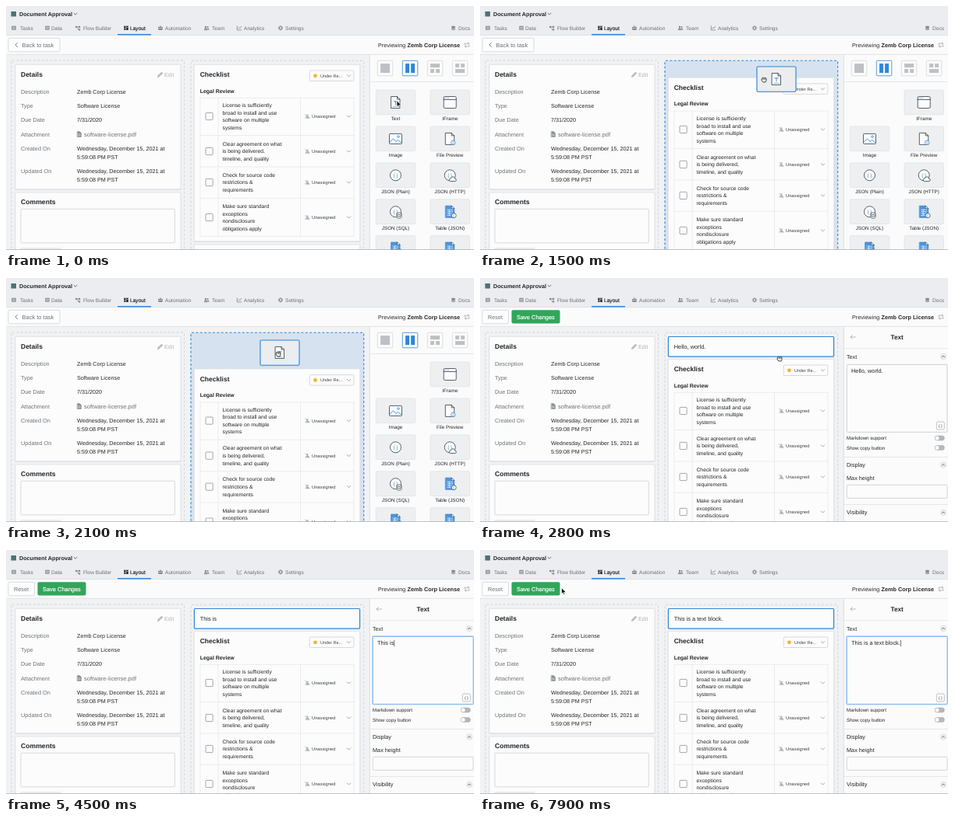
Animation, 600 px wide and 314 px high, one loop 8 s. Source, as an HTML page:

```html
<!DOCTYPE html>
<html lang="en">
<head>
<meta charset="utf-8">
<title>Layout editor</title>
<style>
html, body { margin: 0; width: 100%; height: 100%; overflow: hidden; background: #f1f2f4; }
svg { display: block; width: 100vw; height: 100vh; }
text { font-family: "Liberation Sans", Arial, sans-serif; white-space: pre; text-rendering: geometricPrecision; }
</style>
</head>
<body>
<svg id="stage" viewBox="0 0 600 314" preserveAspectRatio="none"></svg>
<script>
const LOOP = 8000;
const BLUE = '#3186d8', INK = '#232629', MUTED = '#6d7278', LINE = '#dee0e4', PAPER = '#fcfcfc';
const OWNER = 'Zemb Corp License';

// ---- drawing helpers (y of text is its visual middle) ----
const text = (x, y, s, size, fill = INK, weight = 'normal', anchor = 'start') => {
  const medium = weight === 'medium' ? ` stroke="${fill}" stroke-width=".18"` : '';
  const bold = weight === 'bold' ? ' font-weight="700"' : '';
  return `<text x="${x}" y="${(y + size * 0.36).toFixed(2)}" font-size="${size}" fill="${fill}" text-anchor="${anchor}"${bold}${medium}>${s}</text>`;
};
const box = (x, y, w, h, fill = 'none', stroke = 'none', r = 0, sw = 1, extra = '') =>
  `<rect x="${x}" y="${y}" width="${w}" height="${h}" rx="${r}" fill="${fill}" stroke="${stroke}" stroke-width="${sw}" ${extra}/>`;
const path = (d, stroke = MUTED, sw = 0.8, fill = 'none') =>
  `<path d="${d}" fill="${fill}" stroke="${stroke}" stroke-width="${sw}" stroke-linejoin="round" stroke-linecap="round"/>`;
const circle = (x, y, r, fill = 'none', stroke = 'none', sw = 0.8) =>
  `<circle cx="${x}" cy="${y}" r="${r}" fill="${fill}" stroke="${stroke}" stroke-width="${sw}"/>`;
const at = (x, y, body) => `<g transform="translate(${x} ${y})">${body}</g>`;
const group = (id, body) => `<g id="${id}">${body}</g>`;
const chevron = (x, y, r = 2.2, color = '#8a8f95') =>
  path(`M${x - r} ${y - r / 2}l${r} ${r} ${r} ${-r}`, color, 0.8);
const card = (x, y, w, h) =>
  box(x - 0.5, y, w + 1, h + 1.2, '#e0e2e5', 'none', 1) + box(x, y, w, h, PAPER, '#d9dce0', 1, 0.7);

// ---- header and toolbar ----
function header() {
  const c = '#85898f';
  const icons = [
    [10, box(-2.8, -2.5, 5.6, 5, c, 'none', 0.5) + path('M-1.6-.9h3.2M-1.6.9h3.2', '#fff', 0.6)],
    [53, box(-2.8, -2.5, 5.6, 5, c, 'none', 0.5) + path('M-2-.8h4M-2 .9h4', '#fff', 0.6)],
    [92, box(-3, -2.5, 2.2, 2.2, c) + box(1, -2.5, 2.2, 2.2, c) + box(1, 1, 2.2, 2.2, c) + path('M-1-1.4h2M0-1.4v3.4h1', c, 0.6)],
    [154, box(-2.7, -2.6, 2.2, 3, INK) + box(-2.7, 0.9, 2.2, 1.8, INK) + box(0.2, -2.6, 2.6, 1.8, INK) + box(0.2, -0.3, 2.6, 3, INK)],
    [198, box(-2.8, -1.5, 5.6, 4.2, c, 'none', 0.8) + path('M0-3v1.5', c) + circle(-1.1, 0.3, 0.6, '#fff') + circle(1.1, 0.3, 0.6, '#fff')],
    [257, circle(-1, -1.4, 1.2, c) + circle(1.6, -1.2, 1, c) + path('M-3 2.4q0-2.2 2-2.2t2 2.2z', c, 0.3, c) + path('M1.3 2.2h2q0-2-2-1.9', c, 0.3, c)],
    [299, path('M-2.7-2.6v5.2h5.4M-1.3.8L0-.8 1 .2l1.6-2', c, 0.8)],
    [352, circle(0, 0, 1.8, 'none', c, 1.2) + path('M0-2.9v.8M0 2.1v.8M-2.9 0h.8M2.1 0h.8M-2-2l.5.5M1.5 1.5l.5.5M-2 2l.5-.5M1.5-1.5l.5-.5', c, 0.8)],
    [573.5, box(-2.2, -2.6, 4.4, 5.2, c, 'none', 0.6) + path('M-1.2 1.3h2.6', '#fff', 0.6)]
  ];
  const tabs = [[18, 'Tasks'], [58, 'Data'], [99, 'Flow Builder'], [204, 'Automation'],
    [264, 'Team'], [305, 'Analytics'], [358, 'Settings'], [580, 'Docs']];
  return box(0, 0, 600, 38, '#ebedf0') + box(0, 37.6, 600, 24.6, '#fbfbfb') +
    path('M0 37.6H600M0 62.3H600', '#d9dbdf', 0.7) +
    box(6.5, 7, 6.5, 6.5, '#4d7377') +
    text(17, 10, 'Document Approval', 7.2, INK, 'bold') + chevron(89, 10.2, 2, '#555') +
    icons.map(([x, body]) => at(x, 28.3, body)).join('') +
    tabs.map(([x, s]) => text(x, 28.3, s, 6.6, '#6b7076')).join('') +
    text(159, 28.3, 'Layout', 6.6, INK, 'medium') + box(143, 36, 43, 1.5, BLUE) +
    text(477, 50, 'Previewing', 7.2) + text(582, 50, OWNER, 7.28, INK, 'bold', 'end') +
    path('M588 50v-1.8h5.5M592.2 46.8l1.5 1.4-1.5 1.4M594 50.2v1.8h-5.5M589.8 50.6l-1.5 1.4 1.5 1.4', '#9a9ea4', 0.7);
}
const backButton = () => box(3, 41.3, 66, 17.5, '#fdfdfd', '#cfd2d7', 1.5, 0.8) +
  path('M14.5 47.5l-2.5 2.5 2.5 2.5', MUTED, 0.9) + text(20.5, 50, 'Back to task', 7.5, MUTED);
const saveButtons = () => box(3, 41.3, 33.5, 17.5, '#fdfdfd', '#cfd2d7', 1.5, 0.8) +
  text(10, 50, 'Reset', 7.3, MUTED) +
  box(40.5, 41.2, 62, 17.4, '#31a65b', 'none', 2) + text(47, 50, 'Save Changes', 7.45, '#fff', 'medium');

// ---- left column ----
function leftColumn() {
  const rows = [[110.5, 'Description', OWNER], [128.5, 'Type', 'Software License'],
    [146.5, 'Due Date', '7/31/2020'], [165, 'Attachment', ''],
    [183.3, 'Created On', 'Wednesday, December 15, 2021 at'], [212.3, 'Updated On', 'Wednesday, December 15, 2021 at']];
  return box(7, 70, 221.5, 260, 'none', '#c9cdd2', 1, 0.8, 'stroke-dasharray="3 2.4"') +
    card(12, 75.3, 212, 160.5) + text(19, 88, 'Details', 8.5, INK, 'bold') +
    path('M194.3 91.6l.5-2 4.6-4.6 1.5 1.5-4.6 4.6z', '#b4b8bd', 0.5, '#b4b8bd') + text(203, 88.3, 'Edit', 7.2, '#b0b4b9') +
    rows.map(([y, k, v]) => text(19, y, k, 7.3, MUTED) + text(91, y, v, 7.2)).join('') +
    text(91, 194.3, '5:59:08 PM PST', 7.2) + text(91, 223.3, '5:59:08 PM PST', 7.2) +
    path('M91.5 161.5h3l2 2v5h-5z', '#8b9097', 0.5, '#8b9097') + path('M92.6 165h2.6M92.6 166.6h2.6', '#fff', 0.5) +
    text(100, 165, 'software-license.pdf', 7.55, MUTED) +
    card(12, 240, 212, 90) + text(19, 252, 'Comments', 8.65, INK, 'bold') +
    box(19, 261.3, 197.3, 43.5, PAPER, '#cdd0d5', 1, 0.8) + box(19, 312, 51, 12, PAPER, '#cdd0d5', 1.5, 0.8);
}

// ---- checklist ----
function checklist() {
  const rows = [
    [142, 'License is sufficiently', 'broad to install and use', 'software on multiple', 'systems'],
    [187, 'Clear agreement on what', 'is being delivered,', 'timeline, and quality'],
    [227, 'Check for source code', 'restrictions &amp;', 'requirements'],
    [272, 'Make sure standard', 'exceptions', 'nondisclosure', 'obligations apply']];
  const row = ([y, ...lines]) =>
    box(256, y - 4.6, 9.2, 9.2, PAPER, '#8f949a', 1, 0.8) +
    lines.map((s, i) => text(277.5, y + (i - (lines.length - 1) / 2) * 9.6, s, 6.75)).join('') +
    circle(386.3, y - 1.4, 1.2, '#b2b6bb') + path(`M383.8 ${y + 2.4}q0-2.3 2.5-2.3t2.5 2.3z`, '#b2b6bb', 0.3, '#b2b6bb') +
    path(`M383.6 ${y - 2.6}l5.4 5`, '#8b9097', 0.6) +
    text(392, y, 'Unassigned', 5.75, '#3d4247') + chevron(439.5, y);
  return card(241.3, 75.3, 212.5, 227.5) + card(241.3, 307, 212.5, 40) +
    text(248.7, 88.2, 'Checklist', 8.5, INK, 'bold') +
    box(389.3, 83, 56.5, 13.5, PAPER, '#cdd0d5', 1, 0.8) + circle(396.5, 89.8, 2.4, '#e9b62c') +
    text(403, 89.8, 'Under Re...', 5.5, '#3d4247') + chevron(439.5, 89.8) +
    text(248.7, 109, 'Legal Review', 6.95, INK, 'bold') +
    path('M249 118.3H446M249 166.5H446M249 207H446M249 247.3H446M249 296.3H446M249 118.3V296.3M272 118.3V296.3M377.5 118.3V296.3M446 118.3V296.3', '#e4e6e9', 0.7) +
    rows.map(row).join('');
}

// ---- component palette; icons are centred on 0,0 ----
const K = '#343b43';
const page = path('M-5.5-7.5h7.5l3.5 3.5v11.5h-11zM2-7.5v3.5h3.5', K, 0.8, PAPER);
const braces = text(0, 0, '{ }', 6, BLUE, 'normal', 'middle');
const json = circle(0, 0, 7, PAPER, K, 0.8) + braces;
const sheet = path('M-5.5-7.5h7.5l3.5 3.5v11.5h-11z', BLUE, 0.8, '#4b95df') +
  path('M-3.5-2.5h7M-3.5 0h7M-3.5 2.5h7M-3.5 5h7M-1-2.5v7.5', '#fff', 0.7) + path('M2-7.5v3.5h3.5z', K, 0.6, '#fff');
const store = path('M1.5 2.5v4.5q0 1.4 3 1.4t3-1.4v-4.5M1.5 4.8q0 1.3 3 1.3t3-1.3', K, 0.7, '#fff') +
  `<ellipse cx="4.5" cy="2.5" rx="3" ry="1.3" fill="#fff" stroke="${K}" stroke-width=".7"/>`;
const cloud = path('M1 7.8q-2.4-.2-2-2.2 .4-1.6 2-1.5 .7-2.4 3-2.1 2 .3 2.3 2.3 2 .2 1.8 2-.3 1.5-2 1.5z', K, 0.8, '#fff');
const textIcon = page + path('M-2.2-1.2h4.4M0-1.2v4.2', BLUE, 0.9) + path('M-3 5.3h6', BLUE, 0.6);
const ICONS = {
  'IFrame': box(-8, -7.5, 16, 15, PAPER, K, 1.5, 0.8) + path('M-8-3.5h16', K, 0.8) + path('M-6-5.5h.2M-4-5.5h.2M-2-5.5h.2', BLUE, 0.9),
  'Image': box(-8, -6.5, 16, 13, PAPER, K, 1, 0.8) + path('M-7.6 4.5l4.6-4.5 3.5 3.5 2.5-2 4.4 3.5', BLUE, 0.9) + circle(3.5, -2.8, 1.3, 'none', BLUE),
  'File Preview': page + circle(4, 4.8, 2.7, '#fff', BLUE, 0.8) + path('M4 4.5v1.5M4 3.3v.1', BLUE, 0.7),
  'JSON (Plain)': json,
  'JSON (HTTP)': json + cloud,
  'JSON (SQL)': json + store,
  'Table (JSON)': sheet + circle(5, 5, 3, '#fff', K, 0.7) + text(5, 5, '{}', 3.6, BLUE, 'normal', 'middle')
};
function tile(i, name, icon) {
  const x = i % 2 ? 544 : 474.3, y = 108 + (i >> 1) * 46.9;
  return box(x, y, 50.4, 31.8, '#edeff1', '#dfe1e5', 1.5, 0.7) + at(x + 25.2, y + 16, icon) +
    text(x + 25.2, y + 36.7, name, 6.3, INK, 'normal', 'middle');
}
function palette() {
  const layouts = [[[0, 0, 12, 12]], [[0, 0, 5, 12], [7, 0, 5, 12]],
    [[0, 0, 12, 5], [0, 7, 5, 5], [7, 7, 5, 5]], [[0, 0, 5, 5], [7, 0, 5, 5], [0, 7, 12, 5]]];
  return layouts.map((parts, i) => at(476.3 + i * 32, 70.3,
    box(0, 0, 19.5, 19.5, PAPER, i === 1 ? BLUE : '#d3d6da', 1, 0.8) +
    parts.map(([x, y, w, h]) => box(x + 3.8, y + 3.8, w, h, i === 1 ? BLUE : '#bdc0c4')).join(''))).join('') +
    path('M467 97.5H600', LINE, 0.7) +
    Object.keys(ICONS).map((name, i) => tile(i + 1, name, ICONS[name])).join('') +
    tile(8, '', sheet + store) + tile(9, '', sheet + cloud);
}

// ---- settings of the text block ----
function settings() {
  const fold = y => circle(594, y, 4, '#eaecee', '#dcdee2', 0.5) + path(`M592.3 ${y + 0.8}l1.7-1.7 1.7 1.7`, '#555', 0.8);
  const toggle = y => box(583, y - 3, 12.4, 6, '#b4b7bb', '#a2a6ab', 3, 0.5) + circle(586, y, 2.5, '#fff');
  return path('M481.5 76h-6.5M477.5 73.5l-2.5 2.5 2.5 2.5', '#a3a7ad', 0.8) +
    text(534.7, 76, 'Text', 8.2, INK, 'bold', 'middle') + path('M467 90.8H600M467 230.5H600M467 291.5H600', LINE, 0.7) +
    text(470, 101, 'Text', 7.2) + fold(101) +
    box(469, 110, 131, 89.6, '#c3ddf6', 'none', 2, 1, 'id="glow"') +
    box(470.3, 111.4, 128.7, 86.9, PAPER, '#c8ccd1', 1, 0.9, 'id="area"') +
    box(476, 115.5, 0, 9, '#b4d5fb', 'none', 0, 1, 'id="mark"') +
    `<text id="typed" x="476" y="122.4" font-size="7.4" fill="${INK}"></text>` +
    box(537, 115.8, 0.6, 8.4, '#222', 'none', 0, 1, 'id="caret"') +
    box(585.3, 185, 10, 10, PAPER, '#a6abb1', 1.5, 0.7) + text(590.3, 190, '{ }', 5, '#444', 'normal', 'middle') +
    text(470, 206.2, 'Markdown support', 6.2) + toggle(206) + text(470, 218.5, 'Show copy button', 6.2) + toggle(218.5) +
    text(470, 240.5, 'Display', 7.3) + fold(240.5) +
    text(470, 257, 'Max height', 7.3) + box(470.3, 266.3, 128.7, 17, PAPER, '#c8ccd1', 1, 0.8) +
    text(470, 301.8, 'Visibility', 7.4) + fold(301.8);
}

const arrow = path('M0 0v7.6l1.8-1.7 1.2 2.7 1.3-.6-1.2-2.6h2.5z', '#fff', 0.7, '#111');
const fist = path('M-2.4-2.2q.8-1 1.5-.2 .8-.8 1.5 0 .8-.6 1.4.2 1-.3 1 1v1.6q-.2 1.8-1 2.6h-3q-1.2-1-2-2.6-.6-1.4.6-1.4z', '#222', 0.8, '#e9e9e9') +
  path('M-.9-2v1.6M.6-2v1.6M2-1.8v1.4', '#222', 0.5);
const beam = path('M-1.2-4q1.2 0 1.2 1v6q0 1-1.2 1M1.2-4q-1.2 0-1.2 1v6q0 1 1.2 1', '#333', 0.7);

stage.innerHTML =
  box(0, 0, 600, 314, '#f1f2f4') + leftColumn() +
  box(237, 70.3, 221.7, 260, '#d6e2f0', BLUE, 1, 1, 'id="zone" stroke-dasharray="3 2.4"') +
  group('list', checklist()) +
  group('block', box(241.4, 75.5, 212.2, 25.6, PAPER, BLUE, 1, 1.2) +
    `<text id="preview" x="248.7" y="91.1" font-size="7.4" fill="${INK}"></text>`) +
  box(466.3, 62.3, 134, 252, '#fbfbfb') + path('M466.3 62.3V314', '#d5d8dc', 0.8) +
  group('palette', palette()) + group('source', tile(0, 'Text', textIcon)) + group('settings', settings()) +
  header() + group('back', backButton()) + group('save', saveButtons()) +
  group('drag', box(-0.5, 0.8, 51, 32.5, '#8fa3ba', 'none', 2, 1, 'opacity=".4"') +
    box(0, 0, 50, 32.3, '#ebedf0', BLUE, 1.5, 1.1) + at(25, 16, textIcon)) +
  group('arrow', arrow) + group('fist', fist) + group('beam', beam) +
  path('M0 313.6H600', '#a9adb2', 0.8);

// ---- timeline ----
const el = id => document.getElementById(id);
const show = (id, on) => el(id).setAttribute('visibility', on ? 'visible' : 'hidden');
const set = (id, key, v) => el(id).setAttribute(key, v);
const move = (id, [x, y]) => set(id, 'transform', `translate(${x.toFixed(2)} ${y.toFixed(2)})`);
const clamp = v => Math.max(0, Math.min(1, v));
const ease = p => p * p * (3 - 2 * p);

function follow(keys, t) {
  let i = 0;
  while (i < keys.length - 2 && t >= keys[i + 1][0]) i++;
  const [t0, x0, y0] = keys[i], [t1, x1, y1] = keys[i + 1];
  const p = ease(clamp((t - t0) / (t1 - t0)));
  return [x0 + (x1 - x0) * p, y0 + (y1 - y0) * p];
}
const POINTER = [[0, 501, 122], [200, 501, 122], [1000, 412, 104], [1500, 364, 95], [2100, 349, 98],
  [2300, 384, 104], [2800, 384, 104], [3250, 517, 120], [3600, 476, 120],
  [6850, 476, 120], [7300, 128, 60], [7550, 128, 60], [7900, 104.5, 49]];
const TILE = [[200, 474, 108], [1000, 400, 88], [1500, 355, 78], [2100, 326, 80]];

const SENTENCE = 'This is a text block.';
// time -> number of typed characters
const KEYS = [[3900, 1], [4100, 2], [4200, 3], [4300, 4], [4400, 5], [4450, 6], [4500, 7], [4600, 8], [4700, 9],
  [4900, 10], [5000, 11], [5100, 12], [5200, 13], [5300, 14], [5400, 15],
  [5600, 16], [5700, 18], [5900, 20], [6500, 21]];
const DRAG = 200, HOVER = 900, DROP = 2300, FOCUS = 3250, CLEAR = 3750;

function shift(t) {
  if (t >= DROP) return 29;
  const p = clamp((t - 1400) / 440);
  return 41.6 * (1 - (1 - p) ** 2);
}

function draw(t) {
  const editing = t >= DROP, dragging = t >= DRAG && !editing;
  show('palette', !editing);
  show('source', t < DRAG);
  show('back', !editing);
  ['settings', 'save', 'block'].forEach(id => set(id, 'display', editing ? 'inline' : 'none'));
  show('drag', dragging);
  move('drag', follow(TILE, t));

  const over = t >= HOVER && !editing;
  set('zone', 'fill', over ? '#d6e2f0' : 'none');
  set('zone', 'stroke', over ? BLUE : '#c9cdd2');
  set('zone', 'stroke-width', over ? 1.1 : 0.8);
  move('list', [0, shift(t)]);

  const last = KEYS.filter(k => t >= k[0]).pop();
  const value = t < CLEAR ? 'Hello, world.' : SENTENCE.slice(0, last ? last[1] : 0);
  el('typed').textContent = value;
  el('preview').textContent = value;

  const focused = t >= FOCUS;
  set('glow', 'visibility', focused ? 'inherit' : 'hidden');
  set('area', 'stroke', focused ? '#77b2ea' : '#c8ccd1');
  const marked = t < CLEAR ? 40.7 * ease(clamp((t - FOCUS) / 350)) : 0;
  set('mark', 'x', 516.7 - marked);
  set('mark', 'width', marked);

  // the caret stays lit for half a second after each key
  const idle = t - (last ? last[0] : CLEAR);
  const lit = t >= CLEAR && idle % 1000 < 500;
  set('caret', 'visibility', lit ? 'inherit' : 'hidden');
  if (editing) set('caret', 'x', 476.2 + (value ? el('typed').getComputedTextLength() : 0));

  const spot = follow(POINTER, t);
  const inArea = spot[0] > 470 && spot[1] > 111 && t > 2800;
  const hidden = t >= CLEAR && t < 6850;
  const kind = hidden ? '' : t < DRAG || t >= 6850 && !inArea ? 'arrow' : t < 2850 ? 'fist' : inArea ? 'beam' : 'arrow';
  ['arrow', 'fist', 'beam'].forEach(id => { show(id, id === kind); move(id, spot); });
}

const start = performance.now();
function tick() {
  draw((performance.now() - start) % LOOP);
  requestAnimationFrame(tick);
}
tick();
</script>
</body>
</html>
```
